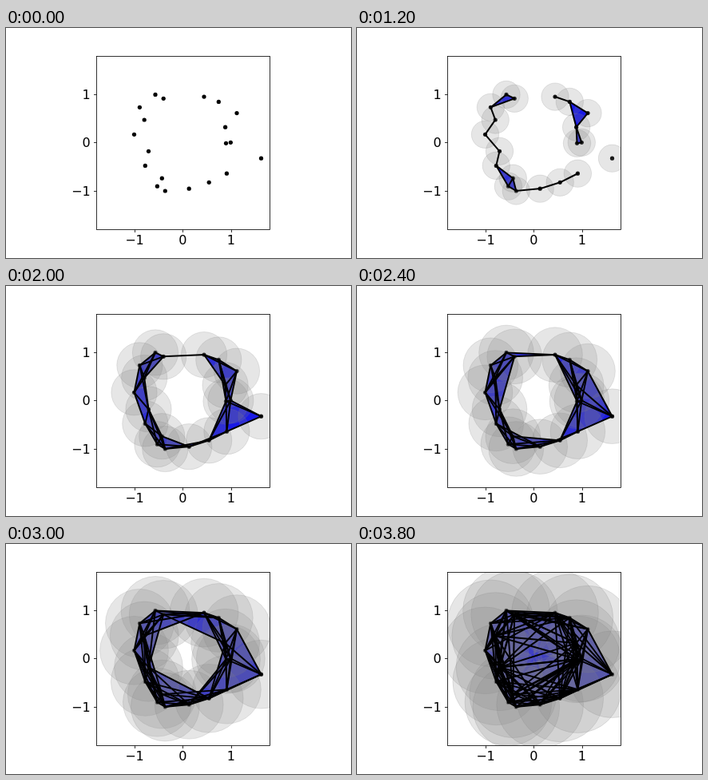
Recreate the animation shown at these times as an HTML page with a canvas. Size 432 by 288 pixels, loop 4 s.

```html
<!DOCTYPE html>
<html lang="en">
<head>
<meta charset="utf-8">
<title>Rips complex</title>
<style>
  html, body { margin: 0; width: 432px; height: 288px; overflow: hidden; background: #fff; }
  canvas { display: block; }
</style>
</head>
<body>
<canvas id="stage" width="432" height="288"></canvas>
<script>
const W = 432, H = 288;
const ctx = document.getElementById('stage').getContext('2d');
const STEPS = 20, STEP_MS = 200;

// Square plot area showing -LIMIT..LIMIT on both axes
const LIMIT = 1.8, SIDE = 217.44, UNIT = SIDE / (2 * LIMIT);
const CX = 221.4, CY = 143.28;
const MAX_RADIUS = 0.9 * UNIT;
const TICK = 3.5;

const snap = v => Math.round(v) + 0.5;
const toX = u => CX + u * UNIT;
const toY = v => CY - v * UNIT;
const left = snap(toX(-LIMIT)), right = snap(toX(LIMIT));
const top_ = snap(toY(LIMIT)), bottom = snap(toY(-LIMIT));

// The sampled cloud, once around the ring
const points = [
  [187, 83.4], [197.2, 88.3], [167.4, 99.3], [173.2, 115], [160.5, 133.3],
  [178.5, 154.3], [174.3, 172.4], [195.3, 188.2], [189.4, 198.2], [199.3, 204],
  [229.2, 201.2], [254.2, 193.3], [276.4, 182.2], [319.5, 163.2], [281.3, 143.3],
  [275.5, 144.3], [274.6, 124.2], [289, 106.6], [266.3, 92.4], [248, 86.1]
];

function path(...pts) {
  ctx.beginPath();
  pts.forEach(([x, y]) => ctx.lineTo(x, y));
}

function line(a, b) {
  path(a, b);
  ctx.stroke();
}

function disc([x, y], r) {
  ctx.beginPath();
  ctx.arc(x, y, r, 0, 2 * Math.PI);
  ctx.fill();
}

// Points closer than reach form edges, mutually close triples form triangles
function buildComplex(reach) {
  const near = (a, b) => Math.hypot(a[0] - b[0], a[1] - b[1]) <= reach;
  const edges = [], triangles = [];
  points.forEach((a, i) => {
    const linked = points.slice(i + 1).filter(p => near(a, p));
    linked.forEach((b, j) => {
      edges.push([a, b]);
      for (const c of linked.slice(j + 1)) {
        if (near(b, c)) triangles.push([a, b, c]);
      }
    });
  });
  return { edges, triangles };
}

function drawAxes() {
  ctx.strokeStyle = ctx.fillStyle = '#000';
  ctx.lineWidth = 0.8;
  ctx.lineCap = 'butt';
  ctx.strokeRect(left, top_, right - left, bottom - top_);
  ctx.font = '16px "DejaVu Sans", sans-serif';
  for (let v = -1; v <= 1; v++) {
    const x = toX(v), y = toY(v), label = String(v).replace('-', '−');
    line([snap(x), bottom], [snap(x), bottom + TICK]);
    line([left, snap(y)], [left - TICK, snap(y)]);
    ctx.textAlign = 'center';
    ctx.fillText(label, x, 271);
    ctx.textAlign = 'right';
    ctx.fillText(label, 105.7, Math.round(y + 6));
  }
}

function drawCloud(radius) {
  const { edges, triangles } = buildComplex(2 * radius);

  ctx.fillStyle = '#00f';
  for (const t of triangles) {
    path(...t);
    ctx.fill();
  }

  ctx.fillStyle = '#000';
  points.forEach(p => disc(p, 2.6));

  if (radius > 0) {
    ctx.fillStyle = ctx.strokeStyle = 'rgba(128,128,128,0.2)';
    ctx.lineWidth = 1;
    for (const p of points) {
      disc(p, radius);
      ctx.stroke();
    }
  }

  ctx.strokeStyle = '#000';
  ctx.lineWidth = 2;
  ctx.lineCap = 'square';
  edges.forEach(([a, b]) => line(a, b));
}

function draw(step) {
  ctx.fillStyle = '#fff';
  ctx.fillRect(0, 0, W, H);
  ctx.save();
  ctx.beginPath();
  ctx.rect(left, top_, right - left, bottom - top_);
  ctx.clip();
  drawCloud(MAX_RADIUS * step / (STEPS - 1));
  ctx.restore();
  drawAxes();
}

const start = performance.now();
let shown = -1;

function tick() {
  const elapsed = performance.now() - start;
  const step = Math.floor(elapsed / STEP_MS) % STEPS;
  if (step !== shown) draw(shown = step);
  requestAnimationFrame(tick);
}
tick();
</script>
</body>
</html>
```
